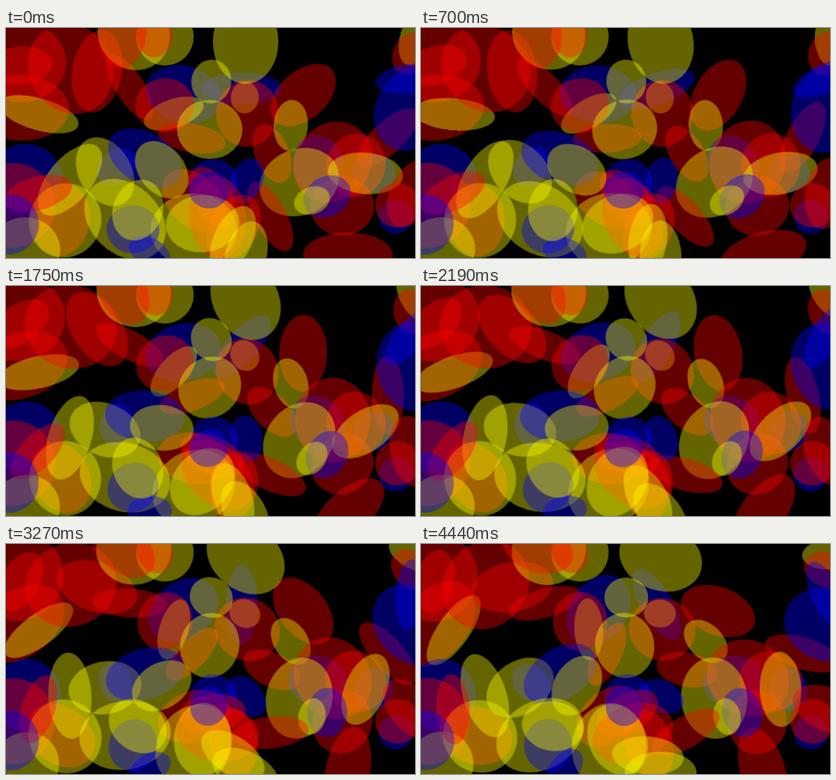
An HTML page for the animation above (4510 ms loop, 512 by 288 pixels).

```html
<!DOCTYPE html>
<html lang="en">
<head>
<meta charset="utf-8">
<title>Turning ellipses</title>
<style>
html, body { margin: 0; width: 100%; height: 100%; overflow: hidden; background: #000; }
svg { display: block; width: 100vw; height: 100vh; }
/* --a: first angle, --w: sweep over 50 steps */
ellipse {
  fill-opacity: .392;
  transform-box: fill-box;
  transform-origin: center;
  animation: turn 4.51s infinite;
}
.r { fill: #f00; }
.y { fill: #ff0; }
.b { fill: #00f; }
@keyframes turn {
  0% { transform: rotate(var(--a)); animation-timing-function: step-end; }
  .665% { transform: rotate(calc(var(--a) + var(--w) * .02)); animation-timing-function: steps(50, end); }
  100% { transform: rotate(calc(var(--a) + var(--w) * 1.02)); }
}
</style>
</head>
<body>
<svg viewBox="0 0 512 288" preserveAspectRatio="none">
<!-- top left -->
<ellipse class="r" cx="20" cy="43" rx="55" ry="50" style="--a:0deg;--w:-70deg"/>
<ellipse class="r" cx="18" cy="47" rx="40" ry="24" style="--a:-5deg;--w:-75deg"/>
<ellipse class="r" cx="18" cy="100" rx="61" ry="41" style="--a:3deg;--w:-52deg"/>
<ellipse class="y" cx="41" cy="108" rx="51.5" ry="20" style="--a:16deg;--w:-71deg"/>
<ellipse class="r" cx="81" cy="51" rx="58" ry="52" style="--a:60deg;--w:-110deg"/>
<ellipse class="r" cx="114" cy="54" rx="52" ry="31" style="--a:-80deg;--w:-110deg"/>
<ellipse class="r" cx="155" cy="74" rx="47" ry="18" style="--a:58deg;--w:-74deg"/>
<ellipse class="y" cx="160" cy="7" rx="47" ry="44" style="--a:50deg;--w:-70deg"/>
<ellipse class="y" cx="199" cy="11" rx="36" ry="36" style="--a:0deg;--w:-80deg"/>
<ellipse class="r" cx="146" cy="5" rx="46" ry="30" style="--a:-85deg;--w:-75deg"/>
<ellipse class="r" cx="186" cy="8" rx="29" ry="22.5" style="--a:-90deg;--w:-20deg"/>
<!-- top middle -->
<ellipse class="b" cx="222" cy="83" rx="48" ry="36" style="--a:15deg;--w:-70deg"/>
<ellipse class="b" cx="295" cy="76" rx="50" ry="20" style="--a:0deg;--w:-120deg"/>
<ellipse class="y" cx="299" cy="87" rx="20" ry="17.5" style="--a:-85deg;--w:-90deg"/>
<ellipse class="y" cx="210" cy="107" rx="39" ry="18" style="--a:-19deg;--w:-74deg"/>
<ellipse class="r" cx="199" cy="97" rx="37" ry="34" style="--a:0deg;--w:-90deg"/>
<ellipse class="r" cx="302" cy="107" rx="42" ry="39" style="--a:-80deg;--w:-90deg"/>
<ellipse class="r" cx="233" cy="138" rx="43" ry="18" style="--a:10deg;--w:-75deg"/>
<ellipse class="r" cx="372" cy="84" rx="48" ry="30" style="--a:-42deg;--w:-117deg"/>
<ellipse class="r" cx="333" cy="157.5" rx="38.5" ry="21.5" style="--a:68deg;--w:-57deg"/>
<ellipse class="y" cx="300" cy="17" rx="53" ry="41" style="--a:-90deg;--w:-70deg"/>
<ellipse class="y" cx="257" cy="67" rx="27.5" ry="25" style="--a:-80deg;--w:-100deg"/>
<ellipse class="y" cx="255" cy="127" rx="41" ry="37" style="--a:0deg;--w:-100deg"/>
<ellipse class="y" cx="356.5" cy="122" rx="32" ry="21.5" style="--a:-86deg;--w:-50deg"/>
<!-- top right -->
<ellipse class="y" cx="512" cy="13" rx="35" ry="19" style="--a:-75deg;--w:-108deg"/>
<ellipse class="r" cx="507" cy="32" rx="28" ry="22" style="--a:-60deg;--w:-100deg"/>
<ellipse class="r" cx="478" cy="137" rx="49" ry="20" style="--a:-43deg;--w:-120deg"/>
<ellipse class="b" cx="510" cy="101" rx="56" ry="46" style="--a:-55deg;--w:-110deg"/>
<ellipse class="b" cx="506" cy="63" rx="44" ry="18" style="--a:-8deg;--w:-105deg"/>
<!-- right -->
<ellipse class="b" cx="391" cy="172" rx="38" ry="32" style="--a:80deg;--w:-90deg"/>
<ellipse class="b" cx="460" cy="182" rx="27" ry="24" style="--a:0deg;--w:-90deg"/>
<ellipse class="r" cx="409" cy="168" rx="53" ry="47" style="--a:-50deg;--w:-100deg"/>
<ellipse class="r" cx="438" cy="172" rx="40" ry="37" style="--a:-70deg;--w:-90deg"/>
<ellipse class="r" cx="421" cy="223" rx="40" ry="37" style="--a:0deg;--w:-85deg"/>
<ellipse class="r" cx="428" cy="284" rx="56" ry="28" style="--a:0deg;--w:-107deg"/>
<ellipse class="y" cx="367" cy="193" rx="51" ry="41.5" style="--a:-22deg;--w:-74deg"/>
<ellipse class="y" cx="450" cy="182" rx="47" ry="26" style="--a:5deg;--w:-97deg"/>
<ellipse class="b" cx="402" cy="211" rx="31" ry="25" style="--a:-30deg;--w:-75deg"/>
<ellipse class="y" cx="383" cy="216" rx="23" ry="17" style="--a:-20deg;--w:-80deg"/>
<ellipse class="b" cx="488" cy="236" rx="21.5" ry="21.5" style="--a:0deg;--w:-90deg"/>
<ellipse class="r" cx="508" cy="207" rx="45" ry="27" style="--a:-65deg;--w:-90deg"/>
<ellipse class="r" cx="490" cy="222" rx="28" ry="28" style="--a:0deg;--w:-80deg"/>
<!-- bottom middle -->
<ellipse class="r" cx="331" cy="236" rx="48" ry="20" style="--a:62deg;--w:-92deg"/>
<ellipse class="b" cx="301" cy="191" rx="29" ry="20" style="--a:-65deg;--w:-90deg"/>
<ellipse class="b" cx="259" cy="194" rx="31" ry="30" style="--a:0deg;--w:-90deg"/>
<ellipse class="r" cx="235" cy="216" rx="46" ry="32" style="--a:45deg;--w:-85deg"/>
<ellipse class="r" cx="258" cy="212" rx="42" ry="24" style="--a:60deg;--w:-90deg"/>
<ellipse class="r" cx="285" cy="250" rx="44" ry="30" style="--a:-60deg;--w:-50deg"/>
<ellipse class="y" cx="235" cy="253" rx="54" ry="46" style="--a:0deg;--w:-80deg"/>
<ellipse class="r" cx="265" cy="237" rx="52" ry="36" style="--a:-95deg;--w:-105deg"/>
<ellipse class="y" cx="246" cy="245" rx="46" ry="36" style="--a:-5deg;--w:-110deg"/>
<ellipse class="y" cx="284" cy="265" rx="45" ry="24" style="--a:-65deg;--w:-110deg"/>
<ellipse class="y" cx="300" cy="286" rx="45" ry="26" style="--a:-75deg;--w:-105deg"/>
<ellipse class="b" cx="254" cy="203" rx="25" ry="23" style="--a:0deg;--w:-90deg"/>
<!-- bottom left -->
<ellipse class="b" cx="25" cy="189" rx="45" ry="44" style="--a:0deg;--w:-90deg"/>
<ellipse class="b" cx="138" cy="174" rx="27" ry="21" style="--a:-40deg;--w:-100deg"/>
<ellipse class="r" cx="8" cy="222" rx="54" ry="53" style="--a:0deg;--w:-90deg"/>
<ellipse class="r" cx="69" cy="240" rx="46" ry="36" style="--a:-80deg;--w:-85deg"/>
<ellipse class="y" cx="124" cy="180" rx="46" ry="33" style="--a:60deg;--w:-95deg"/>
<ellipse class="y" cx="80" cy="190" rx="54" ry="27" style="--a:-50deg;--w:-58deg"/>
<ellipse class="b" cx="174" cy="163" rx="50" ry="32" style="--a:30deg;--w:-63deg"/>
<ellipse class="y" cx="195" cy="177.5" rx="40" ry="28.5" style="--a:51deg;--w:-111deg"/>
<ellipse class="y" cx="149" cy="239.5" rx="57.5" ry="43" style="--a:44deg;--w:-72deg"/>
<ellipse class="b" cx="159" cy="252" rx="33" ry="30" style="--a:0deg;--w:-90deg"/>
<ellipse class="b" cx="180" cy="281" rx="28" ry="18" style="--a:30deg;--w:-80deg"/>
<ellipse class="y" cx="165" cy="228" rx="39" ry="31" style="--a:-70deg;--w:-100deg"/>
<ellipse class="y" cx="74" cy="241" rx="47" ry="45" style="--a:-60deg;--w:-90deg"/>
<ellipse class="y" cx="24" cy="278" rx="44" ry="41" style="--a:0deg;--w:-60deg"/>
<ellipse class="r" cx="40" cy="207" rx="44" ry="21" style="--a:-15deg;--w:-78deg"/>
<ellipse class="b" cx="4" cy="246" rx="38" ry="37" style="--a:-60deg;--w:-90deg"/>
</svg>
</body>
</html>
```
